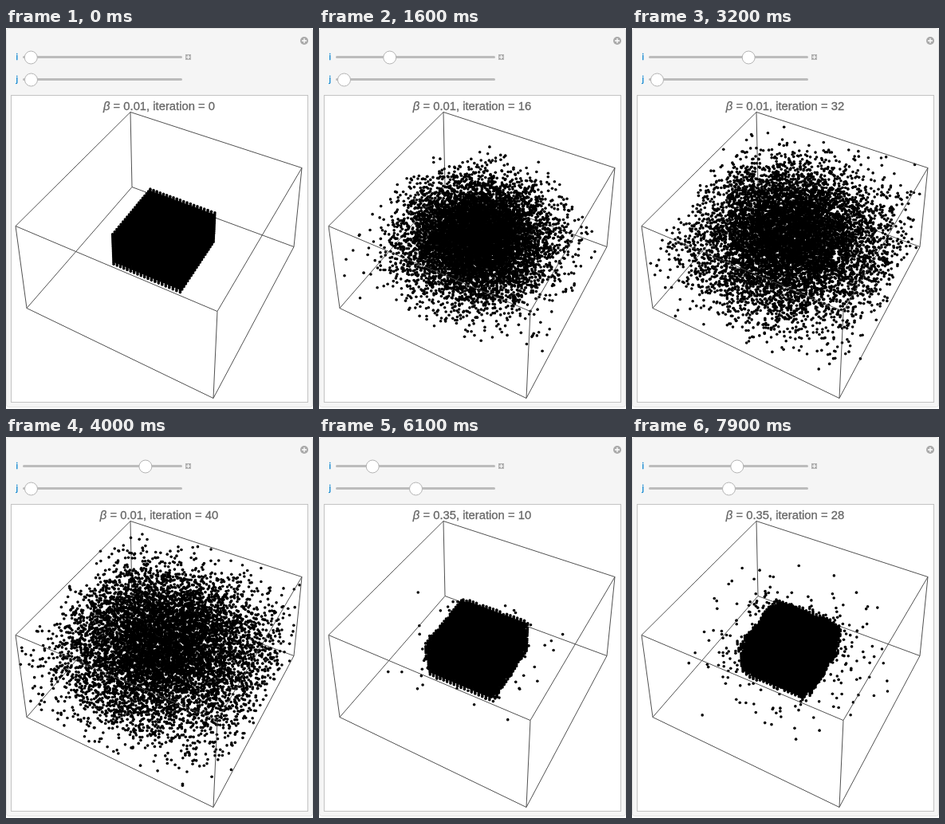
Write an HTML page with a canvas that moves like this. It is 385 px wide and 478 px high and loops after 8000 ms.

```html
<!DOCTYPE html>
<html>
<head>
<meta charset="utf-8">
<style>
html, body { margin: 0; width: 385px; height: 478px; overflow: hidden; background: #fff; }
svg, canvas { position: absolute; left: 0; top: 0; }
text { font-family: "Liberation Sans", Arial, sans-serif; }
.name { font-size: 11px; fill: #0a84d0; stroke: #0a84d0; stroke-width: .3; }
.track { stroke: #bcbcbc; stroke-width: 3; stroke-linecap: round; }
.thumb { fill: #fff; stroke: #b4b4b4; }
#title { font-size: 14.8px; fill: #666; stroke: #666; stroke-width: .3; text-anchor: middle; }
</style>
</head>
<body>
<svg width="385" height="478">
  <rect x=".5" y=".5" width="384" height="475" rx="3" fill="#f5f5f5" stroke="#e2e2e2"/>
  <rect x="6.5" y="84.5" width="372" height="385" fill="#fff" stroke="#c3c3c3"/>
  <circle cx="374" cy="16" r="5" fill="#aaa"/>
  <path d="M371 16h6M374 13v6" stroke="#fff" stroke-width="1.3"/>
  <rect x="225" y="33" width="7" height="7" fill="#b4b4b4"/>
  <path d="M226 36.5h5M228.5 34v5" stroke="#fff"/>
  <text class="name" x="12.5" y="40">i</text>
  <text class="name" x="12.5" y="68">j</text>
  <path class="track" d="M22.5 36.5H219.5M22.5 64.5H219.5"/>
  <circle class="thumb" id="iThumb" cy="37" r="8"/>
  <circle class="thumb" id="jThumb" cy="65" r="8"/>
  <text id="title" x="192" y="103"><tspan font-style="italic">β</tspan><tspan id="values"></tspan></text>
</svg>
<canvas id="plot" width="385" height="478"></canvas>
<script>
const $ = id => document.getElementById(id);
const ctx = $('plot').getContext('2d');

// Lattice of 53 cells per side with a border of walls
const SIZE = 55, LAYER = SIZE * SIZE, COUNT = 8000, SWEEPS = 5, WALL = 2;

function seeded(a) {
  return () => {
    a = a + 0x6D2B79F5 | 0;
    let t = Math.imul(a ^ a >>> 15, 1 | a);
    t = t + Math.imul(t ^ t >>> 7, 61 | t) ^ t;
    return ((t ^ t >>> 14) >>> 0) / 4294967296;
  };
}

// Bound particles hop to free cells; more neighbours make a hop less likely
function simulate(beta, iterations, seed) {
  const rnd = seeded(seed), grid = new Uint8Array(SIZE ** 3).fill(WALL);
  const cells = new Int32Array(COUNT), history = [];
  const step = () => Math.floor(rnd() * 3) - 1;
  const cell = (x, y, z) => x + SIZE * y + LAYER * z;
  for (let z = 1; z < SIZE - 1; z++)
    for (let y = 1; y < SIZE - 1; y++)
      for (let x = 1; x < SIZE - 1; x++) grid[cell(x, y, z)] = 0;
  for (let i = 0; i < COUNT; i++) {
    cells[i] = cell(17 + i % 20, 17 + Math.floor(i / 20) % 20, 17 + Math.floor(i / 400));
    grid[cells[i]] = 1;
  }
  const chance = [0, 1, 2, 3, 4, 5, 6].map(n => Math.exp(-5.2 * beta * (n - 1.1)));
  history.push(cells.slice());
  for (let k = 0; k < iterations; k++) {
    for (let m = 0; m < COUNT * SWEEPS; m++) {
      const i = Math.floor(rnd() * COUNT), from = cells[i];
      const to = from + cell(step(), step(), step());
      if (grid[to]) continue;
      let n = 0;
      for (const d of [1, SIZE, LAYER]) n += (grid[from + d] & 1) + (grid[from - d] & 1);
      if (rnd() > chance[n]) continue;
      grid[from] = 0;
      grid[to] = 1;
      cells[i] = to;
    }
    history.push(cells.slice());
  }
  return history;
}

// Box corners: floor and lid, each back, right, front, left
const floor = [[158, 199], [361, 274], [260, 464], [26, 351]];
const lid = [[156, 105], [371, 175], [265, 355], [12, 248]];

// Perspective from the back corner and its three neighbours
function project(x, y, z) {
  const a = .906 * x, b = .824 * y, c = .941 * z, o = 1 - x - y - z;
  const at = i => (o * floor[0][i] + a * floor[1][i] + b * floor[3][i] + c * lid[0][i]) / (o + a + b + c);
  return [at(0), at(1)];
}

function lines(pairs) {
  ctx.beginPath();
  for (const [p, q] of pairs) {
    ctx.moveTo(p[0], p[1] + .5);
    ctx.lineTo(q[0], q[1] + .5);
  }
  ctx.stroke();
}

const backEdges = [floor[1], floor[3], lid[0]].map(p => [floor[0], p]);
const frontEdges = [[floor[1], floor[2]], [floor[2], floor[3]]];
for (let i = 0; i < 4; i++) {
  frontEdges.push([lid[i], lid[(i + 1) % 4]]);
  if (i) frontEdges.push([floor[i], lid[i]]);
}

const runs = [
  { beta: '0.01', j: 31.5, history: simulate(.01, 50, 7) },
  { beta: '0.35', j: 121.5, history: simulate(.35, 28, 21) }
];

function draw(tick) {
  const run = runs[tick > 50 ? 1 : 0], n = tick > 50 ? tick - 51 : tick;
  $('iThumb').setAttribute('cx', 31.3 + 3.59 * n);
  $('jThumb').setAttribute('cx', run.j);
  $('values').textContent = ` = ${run.beta}, iteration = ${n}`;

  ctx.clearRect(0, 0, 385, 478);
  ctx.strokeStyle = '#484848';
  ctx.lineWidth = .95;
  lines(backEdges);
  ctx.fillStyle = '#000';
  for (const c of run.history[n]) {
    const x = c % SIZE - 1, y = Math.floor(c / SIZE) % SIZE - 1, z = Math.floor(c / LAYER) - 1;
    const [px, py] = project(x / 52, 1 - y / 52, z / 52);
    ctx.beginPath();
    ctx.arc(px + .3, py + .5, 1.8, 0, 7);
    ctx.fill();
  }
  lines(frontEdges);
}

let shown = -1;
function frame() {
  const tick = Math.floor(performance.now() % 8000 / 100);
  if (tick !== shown) draw(shown = tick);
  requestAnimationFrame(frame);
}
frame();
</script>
</body>
</html>
```
